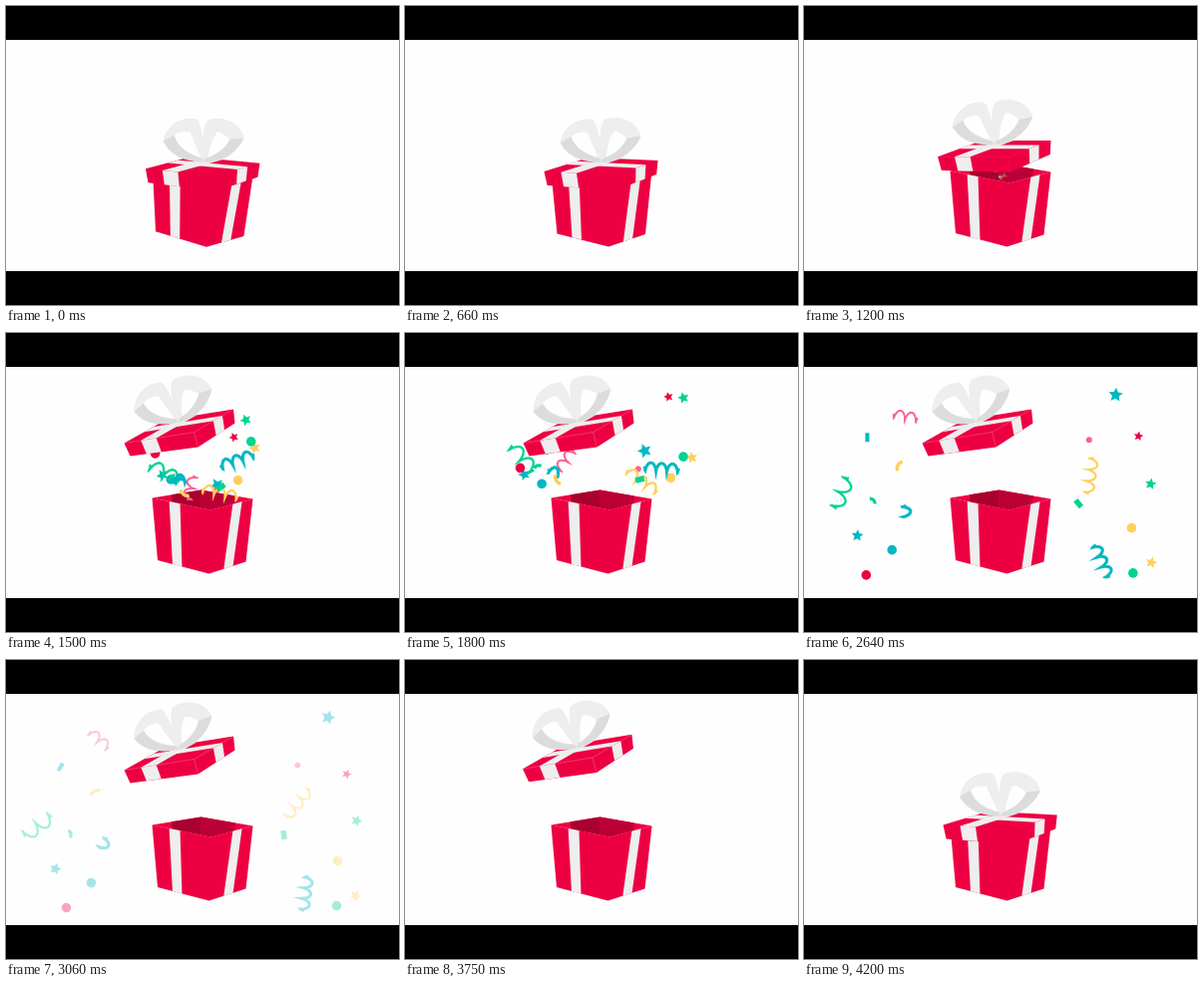
Recreate the animation shown at these times as an HTML page with a canvas. Size 394 px wide and 300 px high, loop 4.92 s.

```html
<!DOCTYPE html>
<html lang="en">
<head>
<meta charset="utf-8">
<title>Gift box</title>
<style>
html, body { margin: 0; width: 100%; height: 100%; overflow: hidden; background: #000; }
canvas { display: block; width: 100vw; height: 100vh; }
</style>
</head>
<body>
<canvas id="stage" width="394" height="300"></canvas>
<script>
const ctx = document.getElementById('stage').getContext('2d');
const LOOP = 4920, RAD = Math.PI / 180, TILT = 12.3;
const RED = '#ed0042', LIGHT = '#eeeeee', SHADE = '#dcdcdc';
const TEAL = '#00b8c1', GREEN = '#00d392', GOLD = '#ffcf5c', PINK = '#f9629b';

const span = (t, a, b) => Math.min(1, Math.max(0, (t - a) / (b - a)));
const cubic = u => u < .5 ? 4 * u ** 3 : 1 - 4 * (1 - u) ** 3;
const smooth = u => u * u * (3 - 2 * u);
const glide = u => 1 - (1 - u) ** 3 * (1 + 3 * u);
const mix = (p, q, u) => p.map((v, i) => v + (q[i] - v) * u);

function poly(color, points) {
  ctx.beginPath();
  for (const p of points) ctx.lineTo(...p);
  ctx.closePath();
  ctx.fillStyle = color;
  ctx.fill();
}

// Ribbon across a four-sided face, from its first edge to the opposite one
function band([a, b, c, d], from, to, from2 = from, to2 = to) {
  poly(LIGHT, [mix(a, b, from), mix(a, b, to), mix(d, c, to2), mix(d, c, from2)]);
}

// Confetti shapes, each centred on the origin
function star(r) {
  ctx.beginPath();
  for (let i = 0; i < 10; i++) {
    const a = i * Math.PI / 5 - Math.PI / 2, d = i % 2 ? r * .47 : r;
    ctx.lineTo(d * Math.cos(a), d * Math.sin(a));
  }
  ctx.closePath();
  ctx.fill();
}
function dot(r) {
  ctx.beginPath();
  ctx.arc(0, 0, r, 0, 7);
  ctx.fill();
}
function chip(h) {
  ctx.fillRect(-4.5, -h / 2, 9, h);
}
function coil(turns, len, width) {
  const amp = len / turns * .38;
  ctx.beginPath();
  for (let u = 0; u <= 1; u += 1 / 64) {
    const a = u * turns * 2 * Math.PI;
    ctx.lineTo((u - .5) * len + amp * .4 * Math.cos(a), amp * Math.sin(a));
  }
  ctx.lineWidth = width;
  ctx.stroke();
}
function arc(r) {
  ctx.beginPath();
  ctx.arc(0, r * .7, r, -2.4, -.75);
  ctx.lineWidth = 3.4;
  ctx.stroke();
}

// Each piece: colour, landing point, lift of its arc, angle, shape
const piece = (color, x, y, lift, angle, shape, ...size) =>
  ({ color, x, y, lift, angle, shape, size });
const pieces = [
  piece(RED, 341, 114, 82, 10, star, 5),
  piece(TEAL, 323, 57, 17, 5, star, 7.5),
  piece(GREEN, 351, 161, 102, 10, star, 6),
  piece(GOLD, 350, 236, 88, 15, star, 6),
  piece(TEAL, 49, 209, 50, 5, star, 6.2),
  piece(RED, 60, 248, 86, 0, dot, 4.8),
  piece(TEAL, 85, 223, 49, 0, dot, 4.8),
  piece(PINK, 292, 105, 11, 0, dot, 3),
  piece(GOLD, 332, 201, 42, 0, dot, 4.8),
  piece(GREEN, 331, 246, 98, 0, dot, 4.8),
  piece(PINK, 93, 79, 13, 10, coil, 2.5, 28, 2),
  piece(GREEN, 32, 167, 45, 112, coil, 2.5, 38, 2.3),
  piece(TEAL, 301, 234, 75, 66, coil, 3.5, 38, 3),
  piece(GOLD, 293, 144, 13, 98, coil, 3.5, 40, 2.2),
  piece(TEAL, 99, 184, 40, 85, coil, 1.4, 14, 3.2),
  piece(GOLD, 89, 133, 10, -60, arc, 7),
  piece(GREEN, 63, 174, 39, 45, arc, 5),
  piece(TEAL, 54, 107, 29, 90, chip, 4),
  piece(GREEN, 278, 175, 27, 50, chip, 5.5)
];

function confetti(t) {
  if (t < 1150 || t > 3240) return;
  const grow = span(t, 1150, 1400);
  for (const p of pieces) {
    // Pieces with a longer fall set off earlier
    const lead = 1.2 * (p.lift + p.y - 100);
    const f = glide(span(t + lead, 1150, 3250));
    const spin = p.shape === star ? .03 : .075;
    ctx.save();
    ctx.globalAlpha = 1 - span(t, 2730, 3240);
    ctx.translate(197 + (p.x - 197) * f,
      172 + (p.y - 172) * f - p.lift * 4 * f * (1 - f));
    ctx.rotate((p.angle + spin * (t - 2640)) * RAD);
    ctx.scale(grow, grow);
    ctx.fillStyle = ctx.strokeStyle = p.color;
    p.shape(...p.size);
    ctx.restore();
  }
}

const box = {
  left: [146, 165], back: [195, 157], right: [247, 166], front: [205, 177],
  leftFoot: [151.5, 227.5], foot: [203, 241], rightFoot: [240, 229]
};
function boxInside() {
  const { left, back, right, front } = box;
  const seam = mix(left, front, .83);
  poly(RED, [left, back, right, front]);
  poly('#a9002f', [mix(left, back, .4), back, seam, mix(left, front, .34)]);
  poly('#ba0036', [back, mix(back, right, .66), mix(front, right, .56), front, seam]);
}
function boxFront() {
  const { left, right, front, leftFoot, foot, rightFoot } = box;
  poly(RED, [left, front, right, rightFoot, foot, leftFoot]);
  band([left, front, foot, leftFoot], .29, .475);
  band([front, right, rightFoot, foot], .52, .74, .4, .65);
}

const bowParts = [
  [LIGHT, 'M0,0 L-41,-20 C-38,-36 -24,-46 -8,-43 C-3,-38 0,-20 0,0Z'
    + 'M-30,-26 C-26,-30 -20,-31 -14,-30 C-10,-20 -6,-12 -3,-5 C-14,-8 -26,-14 -30,-26Z'],
  [LIGHT, 'M0,0 C-3,-20 -1,-40 4,-43 C18,-48 36,-42 40,-26 L0,0Z'
    + 'M13,-31 C19,-30 23,-27 26,-23 C20,-14 12,-8 5,-5 C6,-14 8,-24 13,-31Z'],
  [SHADE, 'M-41,-20 L-30,-26 C-27,-14 -14,-7 -2,-4 L0,0 C-22,0 -35,-8 -41,-20Z'],
  [SHADE, 'M40,-26 L26,-24 C22,-14 12,-7 2,-4 L0,0 C18,0 33,-10 40,-26Z']
].map(([color, d]) => [color, new Path2D(d)]);

function bow() {
  ctx.save();
  ctx.translate(172.3, 89.3);
  ctx.rotate(-TILT * RAD);
  for (const [color, path] of bowParts) {
    ctx.fillStyle = color;
    ctx.fill(path, 'evenodd');
  }
  ctx.restore();
}

// Drawn in its raised pose; open = 1 raised, 0 closed
function lid(open) {
  const shut = 1 - open;
  const left = [118, 110], front = [188, 99], right = [227.5, 76], back = [159, 87];
  const leftLow = [124, 123], frontLow = [192, 114], rightLow = [229, 90];
  ctx.save();
  ctx.translate(118 + 21 * shut, 110 + 55 * shut);
  ctx.rotate(TILT * shut * RAD);
  ctx.translate(-118, -110);
  poly(RED, [left, back, right, rightLow, frontLow, leftLow]);
  band([left, front, right, back], .24, .46);
  band([front, right, back, left], .49, .72);
  band([left, front, frontLow, leftLow], .24, .46);
  band([front, right, rightLow, frontLow], .49, .72);
  ctx.strokeStyle = `rgba(255,190,205,${.55 * open})`;
  ctx.lineWidth = .5;
  ctx.beginPath();
  for (const corner of [left, right, frontLow]) {
    ctx.moveTo(...front);
    ctx.lineTo(...corner);
  }
  ctx.stroke();
  bow();
  ctx.restore();
}

function openness(t) {
  if (t < 3560) return cubic(span(t, 1040, 1440));
  if (t < 3680) return 1 + .035 * smooth(span(t, 3560, 3680));
  return 1.035 * (1 - cubic(span(t, 3680, 4170)));
}

function draw(t) {
  ctx.fillStyle = '#000';
  ctx.fillRect(0, 0, 394, 300);
  ctx.fillStyle = '#fefefe';
  ctx.fillRect(0, 34, 394, 232);
  const wobble = t < 1060 ? 2.2 * Math.cos(2 * Math.PI * t / 386) : 0;
  ctx.save();
  ctx.translate(197.5, 175.5);
  ctx.rotate(wobble * RAD);
  ctx.translate(-197, -175);
  boxInside();
  confetti(t);
  boxFront();
  lid(openness(t));
  ctx.restore();
}

function tick() {
  draw(performance.now() % LOOP);
  requestAnimationFrame(tick);
}
tick();
</script>
</body>
</html>
```
